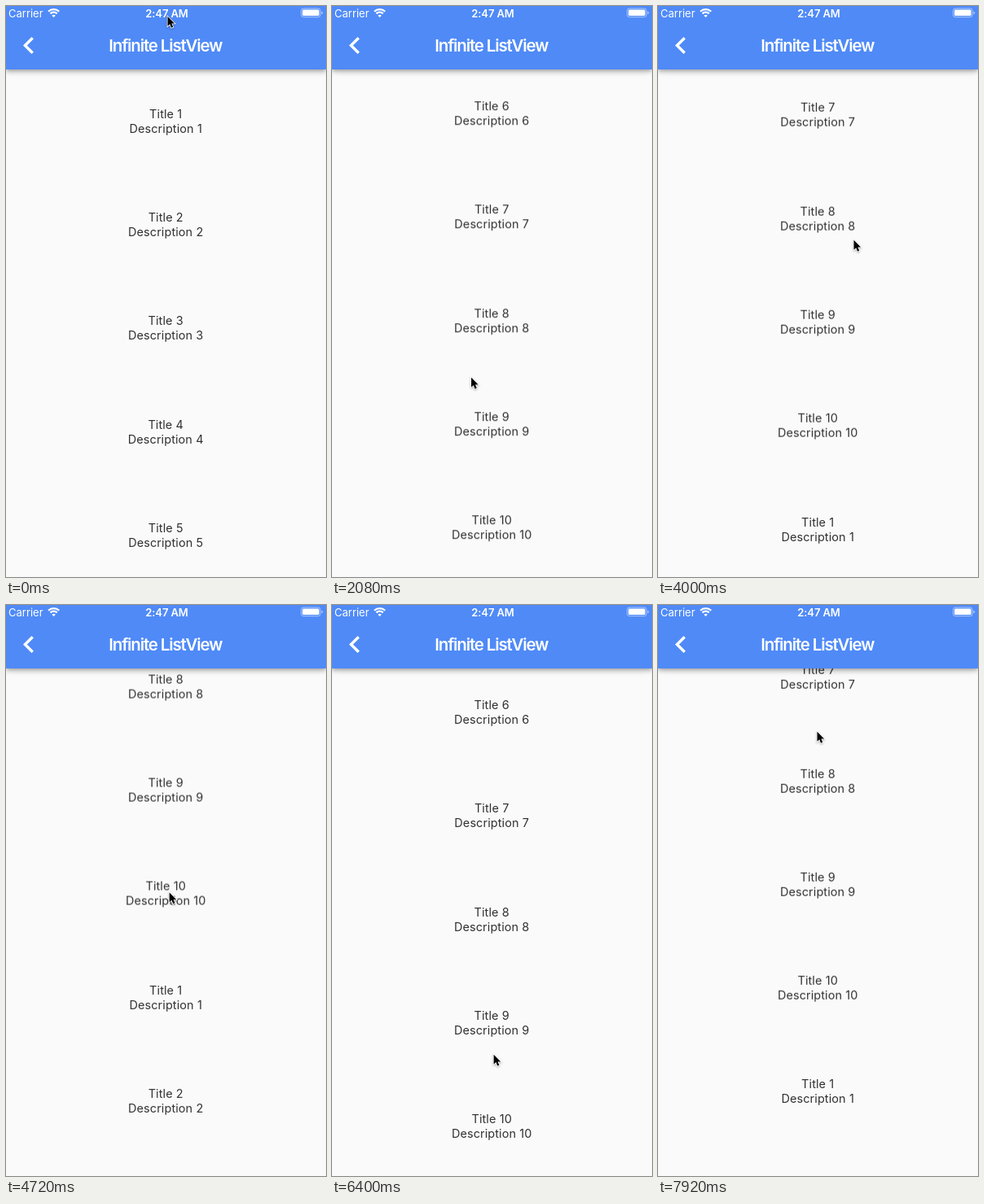
An HTML page for the animation above (8 s loop, 393 by 702 pixels).

```html
<!DOCTYPE html>
<html lang="en">
<head>
<meta charset="utf-8">
<title>Infinite ListView</title>
<style>
  html, body { margin: 0; width: 100%; height: 100%; overflow: hidden; background: #fafafa; }
  #stage { position: relative; width: 393px; height: 702px; overflow: hidden; font-family: Inter, Roboto, sans-serif; }
  #list { position: absolute; left: 0; top: 0; width: 392.4px; will-change: transform; }
  .item {
    position: absolute; width: 100%; text-align: center; white-space: pre;
    font-size: 14.4px; line-height: 18px; letter-spacing: .13px; color: #303030;
  }
  header {
    position: absolute; left: 0; top: 0; width: 393px; height: 78px; background: #4f8af7; color: #fff;
    box-shadow: 0 2px 4px -1px rgba(0,0,0,.2), 0 4px 5px rgba(0,0,0,.14), 0 1px 10px rgba(0,0,0,.12);
  }
  header span { position: absolute; white-space: pre; font-size: 13px; line-height: 18px; top: 0; }
  .carrier { left: 3px; }
  .clock { left: 0; width: 395px; text-align: center; font-weight: 600; letter-spacing: -.1px; }
  header .title {
    left: 0; top: 36px; width: 391.5px; text-align: center;
    font-size: 20.4px; line-height: 25px; font-weight: 600; letter-spacing: -1.1px;
  }
  svg { position: absolute; left: 0; top: 0; overflow: visible; }
  #cursor { filter: drop-shadow(0 1px 1px rgba(0,0,0,.3)); }
</style>
</head>
<body>
<div id="stage">
  <div id="list"></div>
  <header>
    <span class="carrier">Carrier</span>
    <span class="clock">2:47 AM</span>
    <span class="title">Infinite ListView</span>
    <svg width="393" height="78" fill="none" stroke="#fff">
      <path d="M52 6.8a9.4 9.4 0 0 1 13.2 0M54.5 9.4a5.8 5.8 0 0 1 8.2 0" stroke-width="2.3"/>
      <path d="M58.6 14l-2.2-2.3a3.2 3.2 0 0 1 4.4 0z" fill="#fff" stroke="none"/>
      <rect x="362.5" y="3" width="23.6" height="10.6" rx="2.6" stroke-opacity=".5"/>
      <rect x="364" y="4.5" width="20.6" height="7.6" rx="1.4" fill="#fff" stroke="none"/>
      <path d="M387.4 6.4q1.8.5 1.8 1.9t-1.8 1.9z" fill="#fff" fill-opacity=".5" stroke="none"/>
      <path d="M32.7 39.2L23.4 48.5L32.7 57.8" stroke-width="3.4"/>
    </svg>
  </header>
  <svg id="cursor" width="12" height="18">
    <path transform="translate(.5 .8) scale(.86)" d="M0 0V14L3.2 11L5.3 16.2L7.8 15.2L5.7 10.2H10Z"
      stroke="#fff" stroke-width="1.8" paint-order="stroke"/>
  </svg>
</div>
<script>
  const LOOP = 8000, STEP = 80, PITCH = 127.3, PAGE = 10, VIEW = 624;
  const FIRST_END = 645.5, SECOND_END = FIRST_END + PAGE * PITCH;
  const HELD = 771.3, CAUGHT = 1392.7;

  // Where the pointer turns: time, x, y
  const turns = [
    [0, 198, 12], [880, 172, 640], [1360, 155, 308], [1840, 155, 308], [2720, 188, 622], [2880, 188, 622],
    [3600, 260, 290], [4000, 240, 287], [4400, 204, 655], [4800, 200, 340], [5360, 199, 675],
    [5600, 199, 661], [5840, 196, 310], [7040, 199, 648], [7200, 199, 648], [7920, 195, 155]
  ];

  const clamp = u => Math.min(1, Math.max(0, u));
  const easeOut = u => 1 - (1 - u) ** 2;
  const easeInOut = u => u * u * (3 - 2 * u);
  const mix = (a, b, u) => a + (b - a) * u;

  function pointerAt(t) {
    const i = turns.findLastIndex(turn => turn[0] <= t);
    const [t0, x0, y0] = turns[i], [t1, x1, y1] = turns[i + 1] ?? [LOOP, x0, y0];
    const u = easeOut((t - t0) / (t1 - t0));
    return [mix(x0, x1, u), mix(y0, y1, u)];
  }

  // Runs past the goal by `bounce`, then springs back to it
  function fling(t, from, to, run, bounce = 0) {
    if (t < run) return mix(from, to + bounce, easeInOut(clamp(t / run)));
    return to + bounce * Math.exp((run - t) / 160);
  }

  // Rubber-band resistance past the end of the list
  function stretch(drag) {
    const pull = .52 * Math.max(0, drag);
    return pull / (1 + pull / VIEW);
  }

  function scrollAt(t, y) {
    if (t < 2880) return fling(t - 880, 0, FIRST_END, 320, 62);
    if (t < 4000) return FIRST_END + stretch(590 - y);
    if (t <= 5600) return fling(t - 4400, HELD, CAUGHT, 960);
    if (t < 7200) return fling(t - 5600, CAUGHT, SECOND_END, 160, 45);
    return SECOND_END + stretch(608 - y);
  }

  const list = document.getElementById('list');
  const cursor = document.getElementById('cursor');
  const items = Array.from({ length: 3 * PAGE }, (_, i) => {
    const n = i % PAGE + 1, item = document.createElement('div');
    item.className = 'item';
    item.textContent = `Title ${n}\nDescription ${n}`;
    item.style.top = 123.6 + i * PITCH + 'px';
    return list.appendChild(item);
  });

  function draw(now) {
    const t = Math.floor(now % LOOP / STEP) * STEP;
    const [x, y] = pointerAt(t);
    const loaded = PAGE * (t < 3200 ? 1 : t < 7840 ? 2 : 3);
    items.forEach((item, i) => item.style.visibility = i < loaded ? 'visible' : 'hidden');
    list.style.transform = `translateY(${-scrollAt(t, y)}px)`;
    cursor.style.transform = `translate(${x}px, ${y}px)`;
  }

  let start;
  function tick(now) {
    start ??= now;
    draw(now - start);
    requestAnimationFrame(tick);
  }
  draw(0);
  requestAnimationFrame(tick);
</script>
</body>
</html>
```
